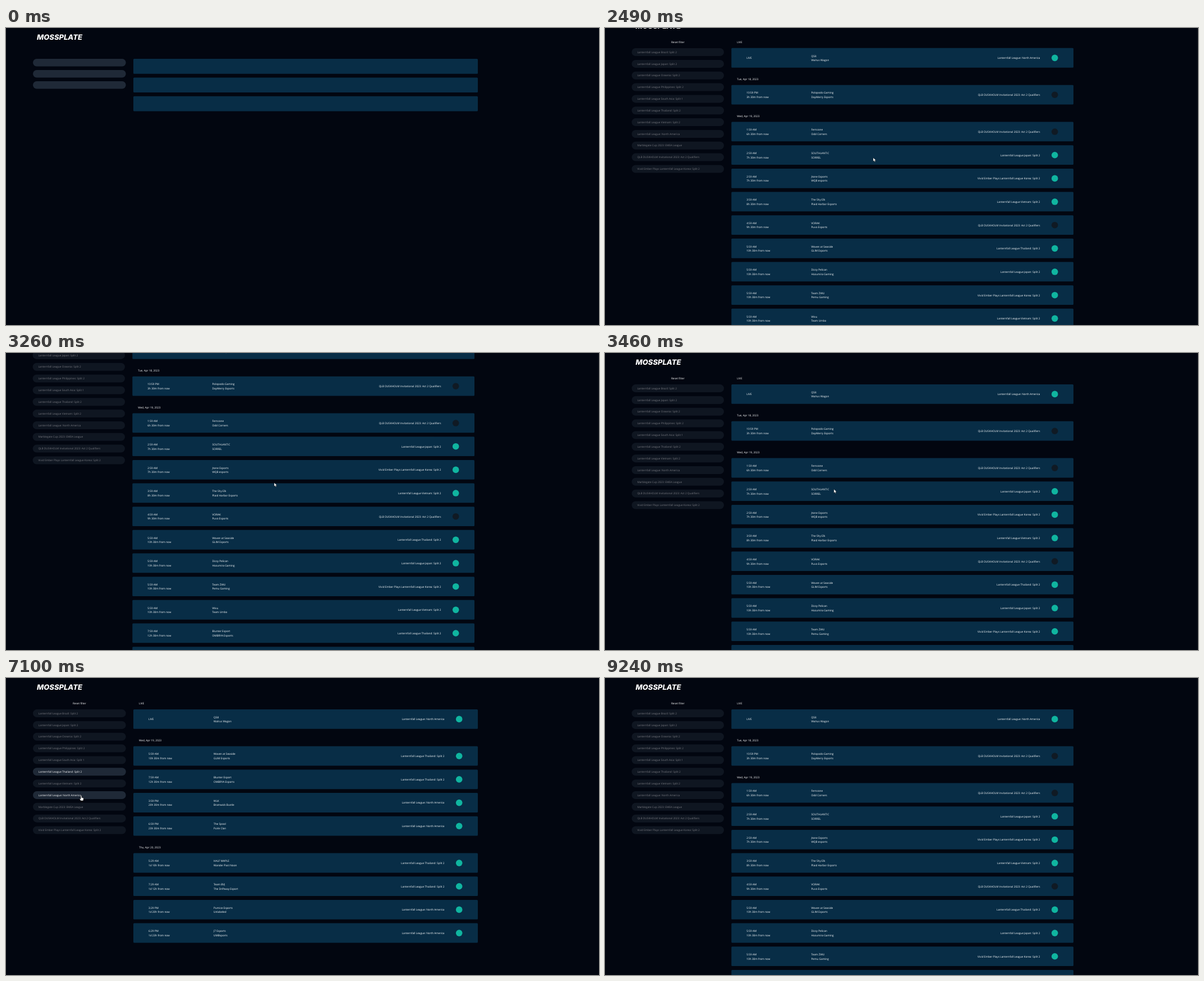
An HTML page for the animation above (9810 ms loop, 1057 px wide and 530 px high).

```html
<!DOCTYPE html>
<html lang="en">
<head>
<meta charset="utf-8">
<title>Match schedule</title>
<style>
  html, body { margin: 0; width: 100%; height: 100%; overflow: hidden; background: #020610; }
  svg { display: block; width: 1057px; height: 530px; }
  text { font: 4.75px "Open Sans", "Noto Sans", sans-serif; fill: #fff; text-rendering: geometricPrecision; }
  .brand { font: italic 800 13px Inter, sans-serif; }
  .card { fill: #082d46; }
  .pill { fill: #1f2937; }
  .off { opacity: .46; }
  .end { text-anchor: end; }
  .mid { text-anchor: middle; }
</style>
</head>
<body>
<svg id="stage" viewBox="0 0 1057 530"></svg>
<script>
const LOOP = 9810;
const TEAL = '#10b5a0', BLACK = '#101a24', RED = '#dc3640';
const leagues = [
  'Lanternfall League Brazil: Split 2',
  'Lanternfall League Japan: Split 2',
  'Lanternfall League Oceania: Split 2',
  'Lanternfall League Philippines: Split 2',
  'Lanternfall League South Asia: Split 1',
  'Lanternfall League Thailand: Split 2',
  'Lanternfall League Vietnam: Split 2',
  'Lanternfall League: North America',
  'Marblegate Cup 2023: EMEA League',
  'QLB DUSKHOLM Invitational 2023: Act 2 Qualifiers',
  'Vivid Ember Plays Lanternfall League Korea: Split 2'
];
const [JP, TH, VN, NA, EMEA, QLB, KR] = [1, 5, 6, 7, 8, 9, 10];
const badge = { [EMEA]: RED, [QLB]: BLACK };

// Each day: matches as [league, time, time left, first team, second team].
const schedule = {
  'LIVE': [[NA, 'LIVE', '', 'Q58', 'Walrus Wagon']],
  'Tue, Apr 18, 2023': [[QLB, '10:59 PM', '3h 30m', 'Polopodo Gaming', 'DayMerry Esports']],
  'Wed, Apr 19, 2023': [
    [QLB, '1:59 AM', '6h 30m', 'Fernzone', 'Odd Corners'],
    [JP, '2:59 AM', '7h 30m', 'SOUTHLANTIC', 'SORREL'],
    [KR, '2:59 AM', '7h 30m', 'Jtone Esports', 'WQB esports'],
    [VN, '3:59 AM', '8h 30m', 'The Shy Elk', 'Plaid Harbor Esports'],
    [QLB, '4:59 AM', '9h 30m', 'VORAK', 'Puvo Esports'],
    [TH, '5:59 AM', '10h 30m', 'Woven at Seaside', 'GLIM Esports'],
    [JP, '5:59 AM', '10h 30m', 'Dizzy Pelican', 'Hozumira Gaming'],
    [KR, '5:59 AM', '10h 30m', 'Team ZWU', 'Pemu Gaming'],
    [VN, '5:59 AM', '10h 30m', 'Wivu', 'Team Umbo'],
    [TH, '7:59 AM', '12h 30m', 'Blunter Esport', 'OMBRYA Esports'],
    [QLB, '7:59 AM', '12h 30m', 'Tuft Gaming', 'Nine Shy Owls'],
    [EMEA, '1:59 PM', '18h 30m', 'Team Orchards', 'Team Gravel'],
    [NA, '3:59 PM', '20h 30m', 'WLK', 'Bramwick Bustle'],
    [NA, '6:59 PM', '23h 30m', 'The Spool', 'PuVe Clan']
  ],
  'Thu, Apr 20, 2023': [
    [TH, '5:29 AM', '1d 10h', 'HALF MAPLE', 'Wander Past Noon'],
    [TH, '7:29 AM', '1d 12h', 'Team BVJ', 'The Driftway Esport'],
    [NA, '3:29 PM', '1d 20h', 'Pumice Esports', 'Unlabeled'],
    [NA, '6:29 PM', '1d 23h', 'J7 Esports', 'UMBsports']
  ]
};

const text = (x, y, s, cls = '') => `<text x="${x}" y="${y + 1.7}" class="${cls}">${s}</text>`;
const rect = (x, y, w, h, r, cls) =>
  `<rect x="${x}" y="${y}" width="${w}" height="${h}" rx="${r}" class="${cls}"/>`;
const brand = x => `<text x="${x}" y="21.4" class="brand">MOSSPLATE</text>`;

const wide = { side: 48, sideW: 165.7, left: 227, right: 841, teams: 370, brand: 55 };
const narrow = { side: 47.6, sideW: 164.4, left: 225.3, right: 835, teams: 367.5, brand: 54.5 };

function skeleton() {
  const rows = [0, 1, 2];
  return brand(wide.brand) +
    rows.map(i => rect(wide.side, 55 + i * 20, wide.sideW, 13.4, 6.7, 'pill')).join('') +
    '<g id="pulse">' +
    rows.map(i => rect(wide.left, 55 + i * 33.4, 614, 26.7, 1.5, 'card')).join('') + '</g>';
}

function match(m, y, L) {
  const [league, time, left, first, second] = m;
  const x = L.left + 27;
  return rect(L.left, y, L.right - L.left, 34.8, 1.5, 'card') +
    (left ? text(x, y + 14, time) + text(x, y + 21.6, left + ' from now') : text(x, y + 17.7, time)) +
    text(L.teams, y + 14, first) + text(L.teams, y + 21.6, second) +
    text(L.right - 59.5, y + 17.7, leagues[league], 'end') +
    `<circle cx="${L.right - 33.3}" cy="${y + 17.5}" r="5.8" fill="${badge[league] || TEAL}"/>`;
}

function page(L, picked) {
  let out = brand(L.brand) + text(L.side + L.sideW / 2, 45.7, 'Reset filter', 'mid');
  leagues.forEach((name, i) => {
    const y = 63.1 + i * 20.84;
    out += `<g class="${picked.includes(i) ? '' : 'off'}">` +
      rect(L.side, y - 7, L.sideW, 14, 7, 'pill') + text(L.side + 9.8, y, name) + '</g>';
  });
  let y = 55.9;
  for (const [day, all] of Object.entries(schedule)) {
    const shown = all.filter(m => !picked.length || picked.includes(m[0]));
    if (!shown.length) continue;
    out += text(L.left + 10, y - 10.2, day);
    for (const m of shown) {
      out += match(m, y, L);
      y += 41.66;
    }
    y += 24.2;
  }
  return out;
}

const pages = [skeleton(), page(narrow, []), page(wide, [TH]), page(wide, [TH, NA])];
const stage = document.getElementById('stage');
stage.innerHTML = pages.map(p => `<g class="page">${p}</g>`).join('') + `
  <rect id="bar" x="1055" width="2" height="530" fill="#090d16"/>
  <circle id="press" r="5.4" fill="#e6d800" opacity=".7"/>
  <path id="arrow" d="M0 0V6.6L1.6 5.2 2.7 7.5 3.9 7 2.9 4.7H5Z" fill="#fff" stroke="#000" stroke-width=".4"/>
  <path id="hand" d="M-.9 0Q0-1 .9 0V3.3L3.6 4Q4.4 4.3 4.3 5.3L3.7 9H-.9L-3 5.6Q-2.6 4.6-.9 5.8Z" fill="#fff" stroke="#000" stroke-width=".5"/>`;

const views = [...document.querySelectorAll('.page')];
const [pulse, bar, press, arrow, hand] =
  ['pulse', 'bar', 'press', 'arrow', 'hand'].map(id => document.getElementById(id));

const viewTimes = [[0, 0], [1050, 1], [4600, 2], [5700, 3], [7140, 2], [7920, 1]];
const clicks = [[4520, 4600], [5620, 5700], [7060, 7100], [7840, 7920]];
const scrollKeys = [[2440, 0], [2490, 19.6], [2810, 164.5], [3010, 228], [3050, 222], [3380, 0]];
const cursorKeys = [
  [2040, 1042, 270], [2420, 478, 231.5], [3300, 478, 231.5], [3460, 408.5, 243.2],
  [4030, 105, 156], [4230, 115, 167], [4770, 115, 167], [5580, 114.7, 210],
  [5820, 114.7, 210], [6300, 184, 284], [6770, 133.5, 210], [6890, 134, 210],
  [7200, 134, 210], [7590, 138, 170], [8130, 138, 170], [9120, 1052, 521], [9240, 1052, 525]
];

function sample(keys, t) {
  const i = keys.findIndex(k => k[0] > t);
  if (i < 0) return keys[keys.length - 1].slice(1);
  if (i === 0) return keys[0].slice(1);
  const a = keys[i - 1], b = keys[i], f = (t - a[0]) / (b[0] - a[0]);
  return a.slice(1).map((v, j) => v + (b[j + 1] - v) * f);
}

const show = (el, on) => el.setAttribute('display', on ? 'inline' : 'none');

function draw() {
  const t = performance.now() % LOOP;
  const current = viewTimes.filter(v => v[0] <= t).pop()[1];
  const [scroll] = sample(scrollKeys, t);
  views.forEach((v, i) => {
    show(v, i === current);
    v.setAttribute('transform', `translate(0 ${-scroll})`);
  });
  pulse.setAttribute('opacity', t < 490 ? 1 : .8);
  show(bar, current === 1);

  const [x, y] = sample(cursorKeys, t);
  const visible = t >= 2040 && t < 9240;
  const row = (y + scroll - 56.1) / 20.84;
  const onPill = x > 48 && x < 213 && row >= 0 && row < 11 && row % 1 < .67;
  show(arrow, visible && !onPill);
  show(hand, visible && onPill);
  show(press, clicks.some(([a, b]) => t >= a && t < b));
  for (const el of [press, arrow, hand]) el.setAttribute('transform', `translate(${x} ${y})`);
  requestAnimationFrame(draw);
}
draw();
</script>
</body>
</html>
```
